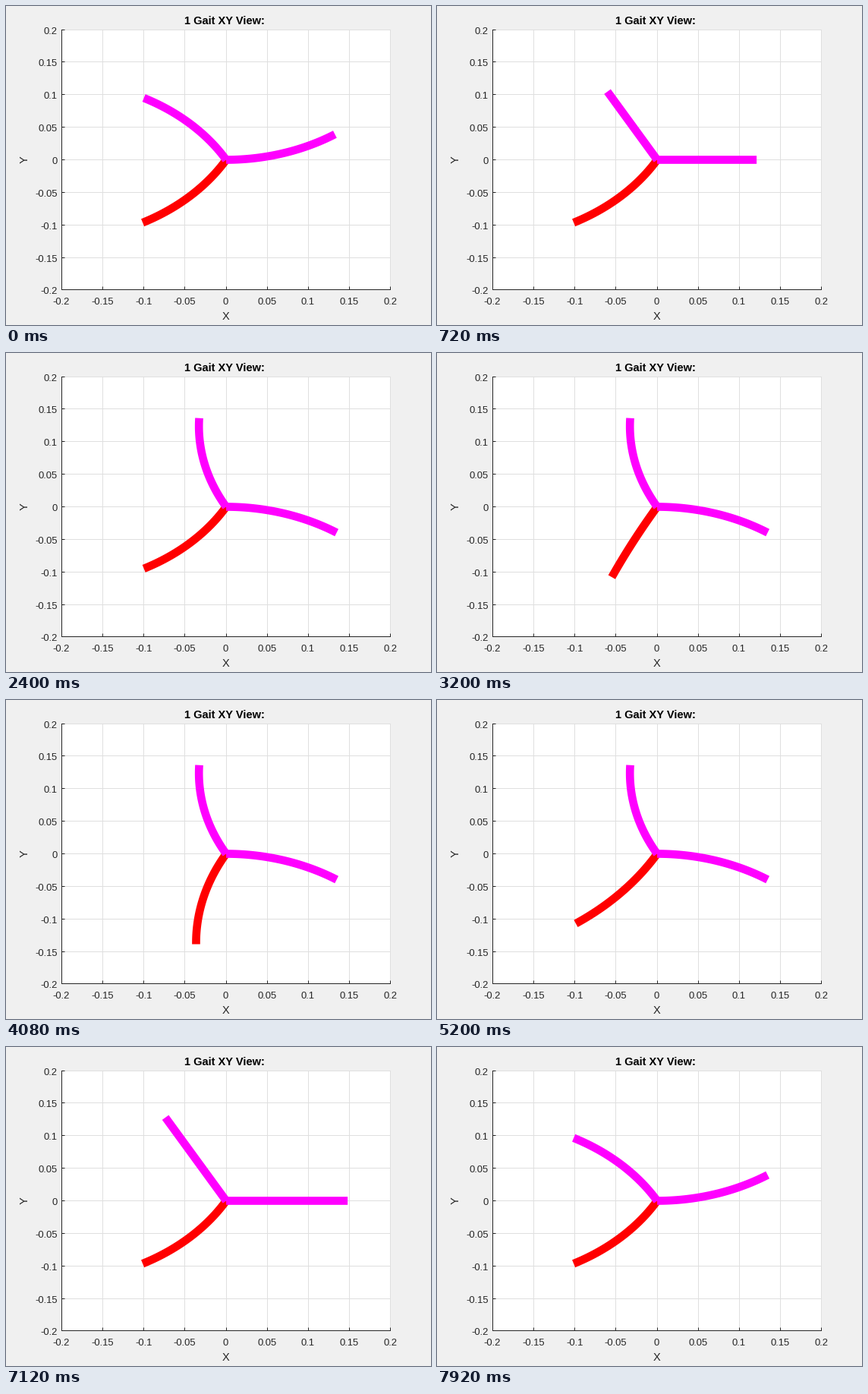
Animation of 560 by 420 pixels, one loop 8000 ms. Source, as a matplotlib script:

```python
import numpy as np
import matplotlib.pyplot as plt
from matplotlib.animation import FuncAnimation
from matplotlib.transforms import ScaledTranslation

W, H, DPI = 560, 420, 100
FRAMES, INTERVAL = 100, 80
PT = 72 / DPI                        # points per pixel
LEFT, RIGHT, TOP, BOTTOM = 73.0, 506.2, 30.6, 373.4
LIM = 0.2
INK = "#262626"
REACH, LIFT, SWAY = 0.1344, 0.0134, 0.0397   # elliptic path of each tip
STEP = np.pi / 20

plt.rcParams["font.family"] = "Liberation Sans"
fig = plt.figure(figsize=(W / DPI, H / DPI), dpi=DPI, facecolor="#f0f0f0")
ax = fig.add_axes([LEFT / W, 1 - BOTTOM / H, (RIGHT - LEFT) / W, (BOTTOM - TOP) / H])
ax.set(xlim=(-LIM, LIM), ylim=(-LIM, LIM), facecolor="white")
ax.set_axisbelow(True)

ticks = np.linspace(-LIM, LIM, 9)
ax.set_xticks(ticks, [])
ax.set_yticks(ticks, [])
ax.tick_params(direction="in", length=4.3 * PT, width=PT, color=INK)
ax.grid(color="#dfdfdf", lw=PT)
for side in ("left", "bottom"):
    ax.spines[side].set(color=INK, linewidth=PT)
for side in ("top", "right"):
    ax.spines[side].set_visible(False)
for line in ax.get_xgridlines() + ax.get_ygridlines():
    line.set_clip_on(False)


def label(x, y, text, size=13, color=INK, **kw):
    opts = dict(ha="center", va="baseline") | kw
    fig.text(x / W, 1 - y / H, text, fontsize=size * PT, color=color, **opts)


for v in ticks:
    text = f"{round(v, 2) + 0.0:g}"
    u = (v + LIM) / (2 * LIM)
    label(LEFT + u * (RIGHT - LEFT), 393, text)
    label(68, BOTTOM - u * (BOTTOM - TOP) + 6, text, ha="right")
label(288, 24, "1 Gait XY View:", 14.67, "black", weight="bold")
label(290, 413, "X", 14.67)
label(25, 202, "Y", 14.67, rotation=90, va="center")

# heading in degrees, colour, starting side
LEGS = [(240, "#ff0000", -1), (120, "#ff00ff", 1), (0, "#ff00ff", 1)]
# legs run through pixel centres
centred = ax.transData + ScaledTranslation(0.5 / DPI, -0.5 / DPI, fig.dpi_scale_trans)
lines = [ax.plot([], [], color=c, lw=10.67 * PT, solid_capstyle="butt", snap=False,
                 transform=centred, zorder=5)[0] for _, c, _ in LEGS]
S = np.linspace(0, 1, 40)


def arc(x, y, heading):
    """Circular arc leaving the origin along heading, ending at local (x, y)."""
    bend = 2 * np.arctan2(y, x)
    length = x / np.sinc(bend / np.pi)
    half = S * bend / 2
    px = length * S * np.sinc(2 * half / np.pi)
    py = length * S * np.sin(half) * np.sinc(half / np.pi)
    c, s = np.cos(heading), np.sin(heading)
    return px * c - py * s, px * s + py * c


def update(i):
    pair = np.clip(i + 1, 0, 20) + np.clip(i - 79, 0, 20)
    single = np.clip(i - 29, 0, 40)
    for line, (deg, _, side), n in zip(lines, LEGS, (single, pair, pair)):
        t = n * STEP
        line.set_data(*arc(REACH - LIFT * np.sin(t), side * SWAY * np.cos(t),
                           np.radians(deg)))
    return lines


anim = FuncAnimation(fig, update, frames=FRAMES, interval=INTERVAL,
                     repeat=True, repeat_delay=0, blit=False)
plt.show()
```
